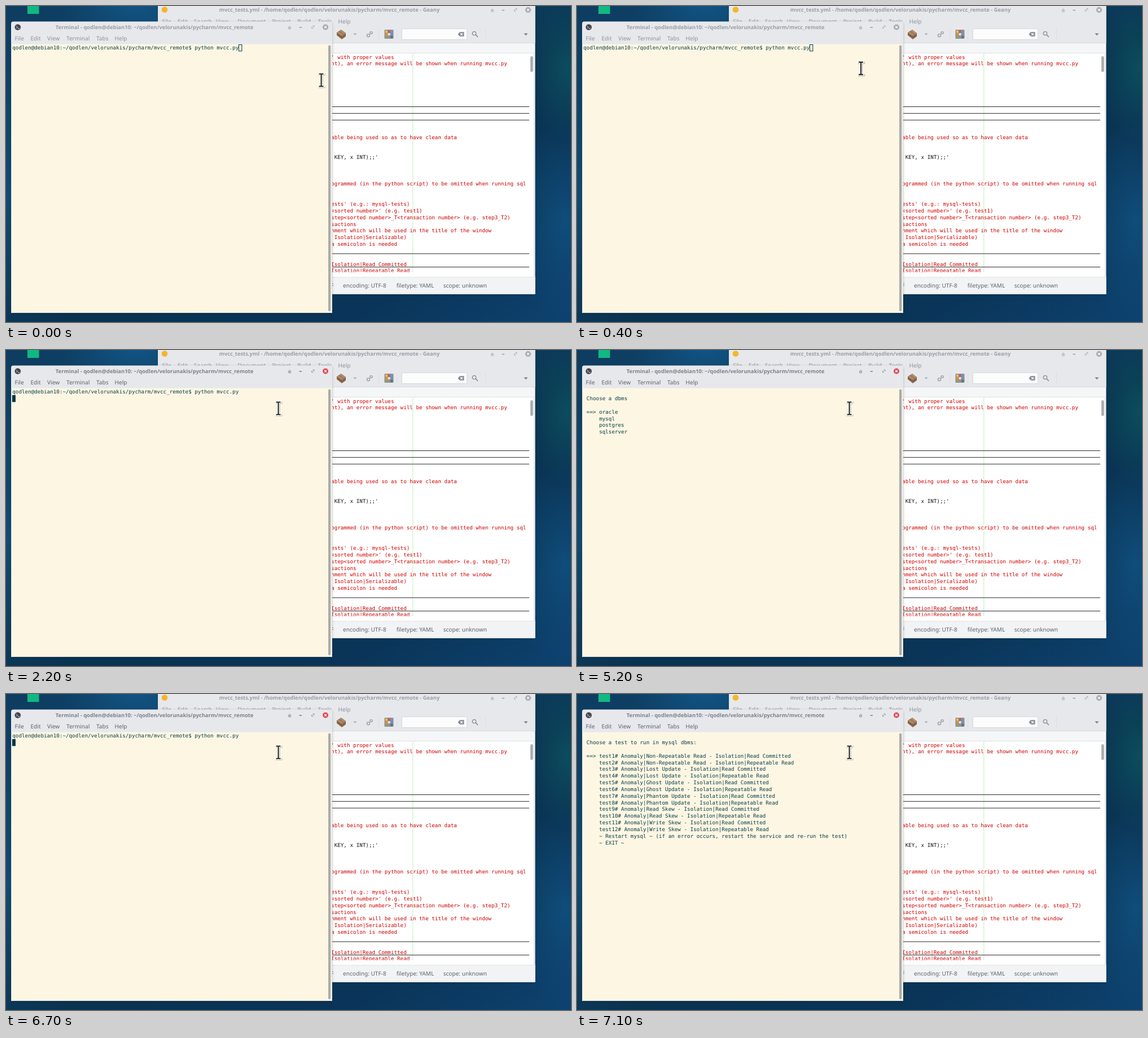
An HTML page for the animation above (8000 ms loop, 1001 by 560 pixels).

```html
<!DOCTYPE html>
<html lang="en">
<head>
<meta charset="utf-8">
<title>Terminal session</title>
<style>
  html, body { margin: 0; width: 100%; height: 100%; overflow: hidden; background: #0b3554; }
  svg { display: block; width: 1001px; height: 560px; }
  text { white-space: pre; text-rendering: geometricPrecision; font: 10.1px "Noto Sans", "Open Sans", sans-serif; }
  .title text { font-weight: 700; font-size: 9.42px; text-anchor: middle; }
  .mono text { font: 9.25px "DejaVu Sans Mono", monospace; }
</style>
</head>
<body>
<svg viewBox="0 0 1001 560">
  <defs>
    <linearGradient id="sky" x1="0" y1="0" x2="1" y2="1">
      <stop offset="0" stop-color="#0d3c60"/>
      <stop offset=".3" stop-color="#124a70"/>
      <stop offset=".55" stop-color="#0a3350"/>
      <stop offset=".8" stop-color="#0a3558"/>
      <stop offset="1" stop-color="#0d4270"/>
    </linearGradient>
    <radialGradient id="teal">
      <stop offset="0" stop-color="#0c5a64"/>
      <stop offset="1" stop-color="#0c5a64" stop-opacity="0"/>
    </radialGradient>
    <radialGradient id="blue">
      <stop offset="0" stop-color="#115484"/>
      <stop offset="1" stop-color="#115484" stop-opacity="0"/>
    </radialGradient>
    <filter id="shadow" x="-10%" y="-10%" width="120%" height="120%">
      <feDropShadow dx="0" dy="1" stdDeviation="2" flood-color="#000" flood-opacity=".2"/>
    </filter>
    <filter id="softShadow" x="-60%" y="-30%" width="220%" height="160%">
      <feDropShadow dx=".8" dy=".9" stdDeviation=".7" flood-color="#000" flood-opacity=".45"/>
    </filter>
    <clipPath id="page"><rect x="570" y="84" width="357" height="387.5"/></clipPath>
    <g id="controls" fill="none" stroke-width="1.1">
      <path d="M-66 1h5l-2.5-3zM-66 3h5" stroke-width=".9"/>
      <path d="M-46.5 .5h4.5" stroke-width="1.5"/>
      <path d="M-22.5-2.5h2.5v2.5zM-24.5-.5v2.5h2.5z" stroke-width=".7"/>
    </g>
    <path id="cross" d="M-2-2l4 4m0-4l-4 4" stroke="#fff" stroke-width="1.1"/>
    <path id="beam" d="M-4-11h3q1 0 1 1q0-1 1-1h3M0-10.500v21M-4 11h3q1 0 1-1q0 1 1 1h3" fill="none"/>
  </defs>

  <rect width="1001" height="560" fill="url(#sky)"/>
  <ellipse cx="995" cy="110" rx="70" ry="130" fill="url(#teal)" opacity=".65"/>
  <ellipse cx="990" cy="380" rx="100" ry="180" fill="url(#blue)" opacity=".75"/>
  <ellipse cx="230" cy="0" rx="130" ry="60" fill="url(#blue)"/>
  <rect x="38" y="-7" width="20.5" height="21" fill="#10b981"/>

  <g id="editor">
    <rect x="269.3" y="-10" width="668.2" height="520.5" fill="#f5f6f7" filter="url(#shadow)"/>
    <rect x="269.3" y="0" width="668.2" height="65" fill="#e7e8eb"/>
    <path d="M269.3 65.5h668.2" stroke="#d7dae0"/>
    <circle cx="281" cy="6.5" r="5.3" fill="#f5b52b"/>
    <g class="title" fill="#9a9ea7"><text x="573" y="10">mvcc_tests.yml - /home/qodlen/qodlen/velorunakis/pycharm/mvcc_remote - Geany</text></g>
    <use href="#controls" x="925" y="7" stroke="#9a9ea7"/>
    <circle cx="925" cy="7" r="5" fill="#a5a9b1"/><use href="#cross" x="925" y="7"/>
    <g id="editorMenu" fill="#8e929b"></g>

    <g id="toolbar">
      <path d="M586 47l8-5 8 6v6l-7 5-9-7z" fill="#8c6a50"/>
      <path d="M586 47l8-5 8 6-7 5z" fill="#b08a69"/>
      <path d="M590 44.5l8 6M586 49.5l9 6 7-5" fill="none" stroke="#6e503b" stroke-width=".8"/>
      <path d="M615.5 48.5h6l-3 3.2z" fill="#aaadb4"/>
      <path d="M917.5 48.5h7l-3.5 3.7z" fill="#777b84"/>
      <g fill="none" stroke="#a0a4ab" stroke-width="1.6">
        <circle cx="642" cy="52.3" r="2.5"/><circle cx="647" cy="47.5" r="2"/>
      </g>
      <path d="M577.5 41v18M660.5 41v18M692.5 41v18M849.5 41v18" stroke="#dcdee3"/>
      <rect x="670.5" y="42" width="16" height="16" rx="1.5" fill="#8a8d92"/>
      <g id="swatches"></g>
      <rect x="701.3" y="40.2" width="115.5" height="19.4" rx="2.5" fill="#fcfcfc" stroke="#cfd3da" stroke-width=".9"/>
      <path d="M800.5 50l3.5-4h7.5v8h-7.5z" fill="#888c94"/>
      <path d="M805 48l4 4m0-4l-4 4" stroke="#fff" stroke-width="1.1"/>
      <circle cx="829.5" cy="48.5" r="3.2" fill="none" stroke="#878b93" stroke-width="1.3"/>
      <path d="M832 51l4 4" stroke="#878b93" stroke-width="1.7"/>
    </g>

    <rect x="570" y="84" width="365.5" height="396" fill="#fff"/>
    <path d="M570 83.5h365.5v396.5" fill="none" stroke="#dfe2e6"/>
    <path d="M720.8 84v387.5" stroke="#c5ecc5"/>
    <rect x="929" y="89" width="4.8" height="28" rx="2.4" fill="#abadb1"/>
    <g class="mono" id="code" clip-path="url(#page)" fill="#d00000"></g>
    <path id="rules" stroke="#111" stroke-width=".9"/>
    <rect x="570" y="480" width="367.5" height="30.5" fill="#f2f3f4"/>
    <path d="M570 480.5h367.5" stroke="#e2e4e8"/>
    <g id="status" fill="#5c616c"></g>
  </g>

  <g id="terminal">
    <path d="M9 544v-512.600q0-4 4-4h561q4 0 4 4v512.600z" fill="#e7e8eb" filter="url(#shadow)"/>
    <rect x="9.5" y="67.5" width="568" height="476" fill="#fdf6e3"/>
    <path d="M9.5 67v476.500h568v-476.500" fill="none" stroke="#dcdcd8"/>
    <rect x="571" y="69.5" width="4.2" height="471.5" rx="2" fill="#a8aaac"/>
    <circle cx="20.8" cy="37.5" r="5.3" fill="#42464d"/>
    <path d="M18 35.3l2.2 2.2-2.2 2.2M21 39.8h2.8" fill="none" stroke="#fff" stroke-width=".9"/>
    <g class="title" id="caption"><text x="263.1" y="41">Terminal - qodlen@debian10: ~/qodlen/velorunakis/pycharm/mvcc_remote</text></g>
    <use id="buttons" href="#controls" x="566" y="37.5"/>
    <circle id="close" cx="566" cy="37.5" r="5"/><use href="#cross" x="566" y="37.5"/>
    <g id="terminalMenu"></g>
    <g class="mono" id="output" fill="#073e49"></g>
    <rect id="caret" height="11.4" stroke="#073642"/>
  </g>

  <g id="pointer" filter="url(#softShadow)">
    <use href="#beam" stroke="#fff" stroke-width="3.8" stroke-linecap="square"/>
    <use href="#beam" stroke="#111" stroke-width="1.8"/>
  </g>
</svg>
<script>
const el = id => document.getElementById(id);
const LOOP = 8000, CELL = 5.57, LINE = 11.84;

const escapeText = s => s.replace(/&/g, '&amp;').replace(/</g, '&lt;');
const textAt = (x, y, s, extra = '') => `<text x="${x}" y="${y}" ${extra}>${escapeText(s)}</text>`;
const labels = (id, y, items) =>
  el(id).innerHTML = items.map(([x, s]) => textAt(x, y, s)).join('');

labels('editorMenu', 31, [[276.5, 'File'], [304, 'Edit'], [333, 'Search'], [372, 'View'],
  [410.5, 'Document'], [471.5, 'Project'], [516, 'Build'], [552.5, 'Tools'], [588.5, 'Help']]);
labels('terminalMenu', 61.3, [[15.5, 'File'], [43.5, 'Edit'], [73, 'View'],
  [107, 'Terminal'], [160, 'Tabs'], [192.5, 'Help']]);
labels('status', 498.8, [[575, 'F'], [597, 'encoding: UTF-8'], [691.8, 'filetype: YAML'], [774.7, 'scope: unknown']]);

el('swatches').innerHTML = ['#e8c34a', '#d9534f', '#7d8fc9', '#e88a3c', '#efe6c4', '#5a9bd4', '#7fb04f', '#b77fc0', '#4f7f54']
  .map((c, i) => `<rect x="${672 + i % 3 * 4.6}" y="${43.5 + Math.floor(i / 3) * 4.6}" width="4" height="4" fill="${c}"/>`).join('');

const code = {
  0: "' with proper values",
  1: 'nt), an error message will be shown when running mvcc.py',
  12: 'able being used so as to have clean data',
  15: " KEY, x INT);;'",
  19: 'ogrammed (in the python script) to be omitted when running sql',
  22: "ests' (e.g.: mysql-tests)",
  23: "<sorted number>' (e.g. test1)",
  24: 'step<sorted number>_T<transaction number> (e.g. step3_T2)',
  25: 'sactions',
  26: 'nment which will be used in the title of the window',
  27: ' Isolation|Serializable)',
  28: 'a semicolon is needed',
  31: 'Isolation|Read Committed',
  32: 'Isolation|Repeatable Read'
};
el('code').innerHTML = Object.entries(code)
  .map(([row, s]) => textAt(576.1, 93.5 + row * LINE, s, row === '15' ? 'fill="#111"' : '')).join('');

const foldedRows = [7, 8, 9, 29, 31];
el('rules').setAttribute('d', foldedRows.map(row => `M570 ${95.6 + row * LINE}h357`).join(''));

const prompt = ['qodlen@debian10:~/qodlen/velorunakis/pycharm/mvcc_remote$ python mvcc.py'];
const menu = (heading, items, chosen) =>
  ['', ' ' + heading, '', ...items.map((s, i) => (i === chosen ? ' ==> ' : '     ') + s)];
const engines = ['oracle', 'mysql', 'postgres', 'sqlserver'];
const anomalies = ['Non-Repeatable Read', 'Lost Update', 'Ghost Update', 'Phantom Update', 'Read Skew', 'Write Skew'];
const tests = anomalies.flatMap((name, i) => ['Read Committed', 'Repeatable Read']
  .map((level, j) => `test${2 * i + j + 1}# Anomaly|${name} - Isolation|${level}`));
tests.push('~ Restart mysql ~ (if an error occurs, restart the service and re-run the test)', '~ EXIT ~');

const screens = [
  { at: 0, lines: prompt, caret: [72, 0] },
  { at: 2200, lines: prompt, caret: [0, 1] },
  { at: 5200, lines: menu('Choose a dbms', engines, 0) },
  { at: 5800, lines: menu('Choose a dbms', engines, 1) },
  { at: 6700, lines: prompt, caret: [0, 1] },
  { at: 7100, lines: menu('Choose a test to run in mysql dbms:', tests, 0) }
];
const pointerPath = [[0, 558.5, 131.3], [300, 538, 124], [400, 503, 110.5], [500, 482.5, 103.3]];

const set = (id, attrs) => Object.entries(attrs).forEach(([k, v]) => el(id).setAttribute(k, v));
let shown;

function render(t) {
  const screen = screens.findLast(s => t >= s.at);
  const [, px, py] = pointerPath.findLast(p => t >= p[0]);
  const focused = t >= 700;
  const chrome = focused ? '#7c818c' : '#9a9ea7';

  if (screen !== shown) {
    shown = screen;
    el('output').innerHTML = screen.lines.map((s, i) => textAt(11.3, 77.2 + i * LINE, s)).join('');
  }
  set('pointer', { transform: `translate(${px} ${py})` });
  set('caption', { fill: chrome });
  set('buttons', { stroke: chrome });
  set('close', { fill: focused ? '#e0485a' : '#a5a9b1' });
  set('terminalMenu', { fill: focused ? '#5c616c' : '#8e929b' });

  const [col, row] = screen.caret || [0, 0];
  set('caret', {
    x: 11.4 + col * CELL, y: 68.5 + row * LINE, width: focused ? 5 : 5.4,
    fill: focused ? '#073642' : 'none',
    visibility: screen.caret ? 'visible' : 'hidden'
  });
}

function tick() {
  render(performance.now() % LOOP);
  requestAnimationFrame(tick);
}
tick();
</script>
</body>
</html>
```
